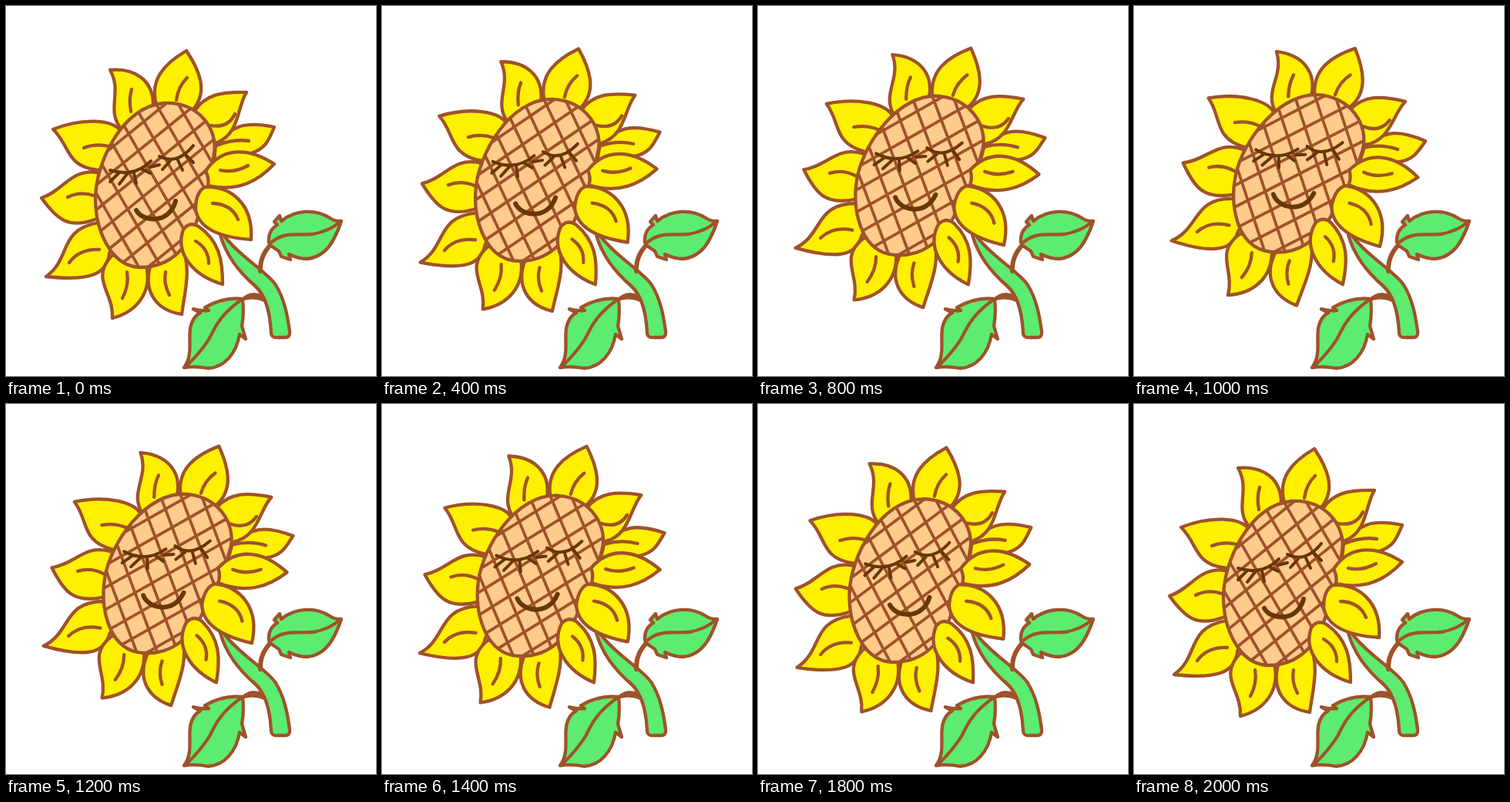
An HTML page that plays this animation: 480x480 px, repeating every 2100 ms.

```html
<!DOCTYPE html>
<html lang="en">
<head>
<meta charset="utf-8">
<title>Swaying sunflower</title>
<style>
  html, body { margin: 0; width: 100%; height: 100%; overflow: hidden; background: #fff; }
  svg { display: block; width: 100%; height: 100%; }
  path { stroke: #9f522a; stroke-width: 4.3; stroke-linecap: round; stroke-linejoin: round; fill: none; }
  .green path { fill: #5cec70; }
  .green .line { fill: none; }
  .green .branch { fill: none; stroke-width: 6; }
  .petal { fill: #fff000; }
  #disc { fill: #ffcc8c; }
  #grid path { stroke-width: 3.8; }
  #face path { stroke: #673706; stroke-width: 4; }
  #face .mouth { stroke-width: 6; }
</style>
</head>
<body>
<svg viewBox="0 0 480 480">
  <defs><clipPath id="inside"><use href="#disc"/></clipPath></defs>
  <g class="green">
    <path d="M278 297C285 322 302 345 323 363C339 377 343 403 344 425Q345 431 353 430L362 430Q369 430 368 422C365 400 361 380 350 362C338 344 304 326 283 298Z"/>
    <path class="branch" d="M330 344Q329 325 343 310"/>
    <path d="M341 307C340 295 345 288 352 284L348 280L355 272L357 279C375 264 402 263 420 275Q428 280 435 279C428 300 417 326 390 328Q380 328 367 322L369 329L357 325L354 318L345 312Z"/>
    <path class="line" d="M345 306C362 292 380 298 398 296Q420 292 433 280"/>
    <path d="M336 382Q322 376 308 380Q318 370 333 377"/>
    <path d="M231 469C244 452 235 429 240 414Q243 403 252 398L243 393Q253 396 263 395L258 391C274 382 290 378 307 380Q309 400 306 415L311 432L303 426C299 450 284 469 262 470Q247 467 231 469Z"/>
    <path class="line" d="M307 380C282 397 273 412 264 431Q253 449 233 468"/>
  </g>
  <g id="head">
    <g id="back"></g>
    <path id="disc" d="M116 250C116 205 150 130 205 126C250 124 275 160 270 190C267 215 263 240 250 270C240 310 215 340 172 339C135 336 116 290 116 250Z"/>
    <g id="grid" clip-path="url(#inside)"></g>
    <g id="front"></g>
    <g id="face">
      <path d="M135 213Q166 223 188 201M147 216L135 228M157 218L147 231M166 217L169 230M175 211L187 217"/>
      <path d="M199 195Q222 207 243 181M213 201L203 212M223 200L229 213M233 193L243 203M187 209L199 206"/>
      <path class="mouth" d="M169 265C178 281 212 283 220 253"/>
    </g>
  </g>
</svg>
<script>
  const byId = id => document.getElementById(id);
  const path = (d, name = '') => `<path class="${name}" d="${d}"/>`;
  // Each petal: outline, then its crease.
  const draw = petals => petals.map(([edge, crease]) => path(edge, 'petal') + path(crease)).join('');

  byId('back').innerHTML = draw([
    ['M272 180C293 156 308 149 348 157C341 174 337 185 318 191L270 200Z', 'M273 181Q294 172 315 175'],
    ['M244 137C258 115 279 111 312 112C299 132 304 166 272 178L250 180Z', 'M265 155Q288 159 297 140'],
    ['M151 161C128 136 152 113 135 83C167 80 192 96 191 131L175 160Z', 'M162 137Q159 121 163 108'],
    ['M195 128C186 96 205 75 234 58C250 82 263 110 243 134L210 150Z', 'M221 122Q223 105 235 93'],
    ['M120 213C77 209 83 180 61 160C98 145 140 146 150 164L150 210Z', 'M101 184Q117 178 133 182'],
    ['M118 276C82 290 67 278 46 249C76 239 83 211 119 216L140 250Z', 'M80 248Q96 240 114 246'],
    ['M134 321C132 349 106 357 52 351C85 328 67 290 120 281L145 300Z', 'M82 333Q95 315 121 316'],
    ['M137 324C109 355 140 371 138 405C169 397 190 372 182 337L160 320Z', 'M157 345Q160 362 151 379'],
    ['M187 338C178 372 196 395 228 400C232 370 241 340 228 311L200 320Z', 'M207 345Q204 360 212 375']
  ]);
  byId('front').innerHTML = draw([
    ['M259 214C278 185 311 181 348 205C328 226 302 242 262 233Q264 224 259 214Z', 'M278 213Q296 217 314 207'],
    ['M230 290C219 321 243 350 281 361C281 330 277 305 250 286Q238 279 230 290Z', 'M246 305Q263 315 263 334'],
    ['M258 235C291 233 321 256 318 303C287 301 251 293 246 264Q246 241 258 235Z', 'M268 256Q293 257 301 277']
  ]);

  const lines = (x, y, angle, gap) => [-4, -3, -2, -1, 0, 1, 2, 3, 4].map(i =>
    `<path d="M-150 ${i * gap}H150" transform="translate(${x} ${y}) rotate(${angle})"/>`).join('');
  byId('grid').innerHTML = lines(178, 215, -39, 25) + lines(187, 214, 60, 25);

  // Ten equal steps to the right, ten back, one tenth of a second each.
  function frame(now) {
    const step = Math.floor(now / 100) % 21;
    const lean = 1.18 * Math.min(step, 20 - step);
    byId('head').setAttribute('transform', `rotate(${lean} 275 312)`);
    requestAnimationFrame(frame);
  }
  frame(performance.now());
</script>
</body>
</html>
```
